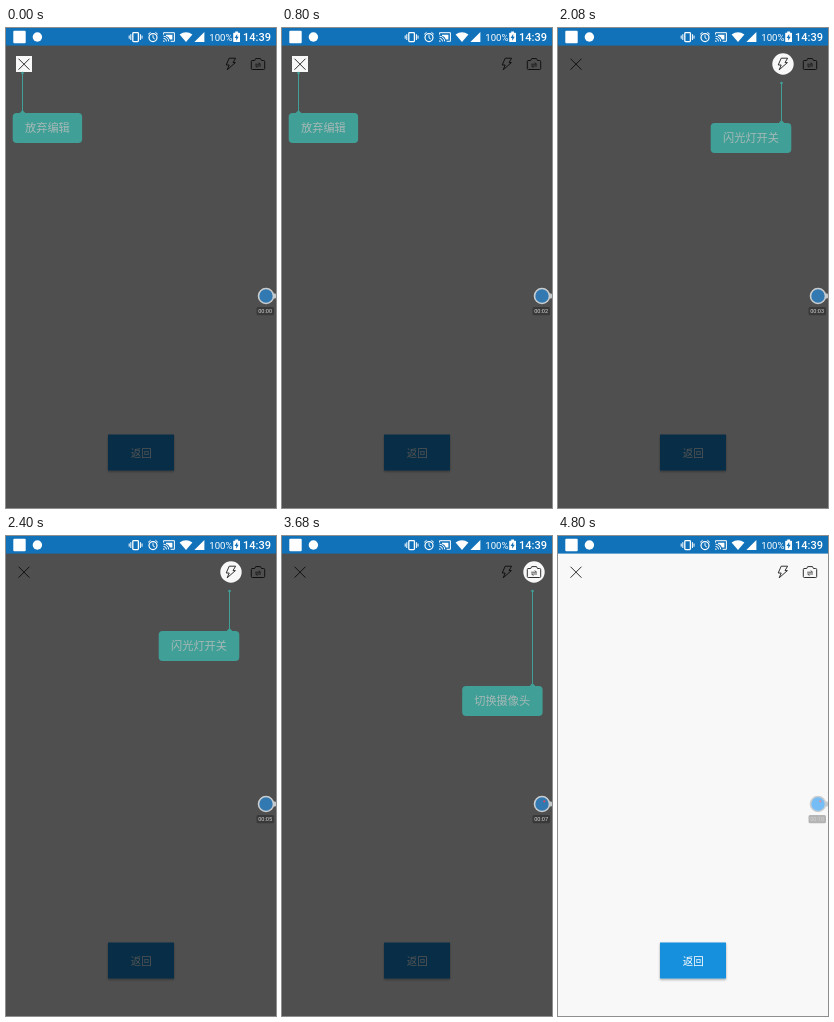
These frames come from a looping animation (270x480 px, 5600 ms). An HTML page:

```html
<!DOCTYPE html>
<html lang="zh-CN">
<head>
<meta charset="utf-8">
<title>Camera guide</title>
<style>
  html, body { margin: 0; width: 100%; height: 100%; overflow: hidden; background: #f8f8f8; }
  svg { display: block; width: 100%; height: 100%; }
  text { font-family: "Noto Sans CJK SC", "Noto Sans CJK", "Noto Sans", sans-serif; }
  .latin { font-family: Roboto, sans-serif; fill: #fff; }
  .line { fill: none; stroke: #303030; stroke-linecap: round; stroke-linejoin: round; }
  .status { fill: #fff; }
  .status .stroke { fill: none; stroke: #fff; }
  .dim { fill: #000; fill-opacity: .677; fill-rule: evenodd; }
  .tip { fill: #40a097; }
  .tip text { font-size: 11.2px; fill: #a6b8b6; }
  .tip path { fill: none; stroke: #40a097; }
  .timer { font-size: 5.6px; fill: #d4d4d4; text-anchor: middle; }

  /* --at: start step, each step lasts 800 ms */
  .one, .two {
    visibility: hidden;
    animation: one 5600ms step-end infinite;
    animation-delay: calc((var(--at) - 7) * 800ms);
  }
  .two { animation-name: two; }
  @keyframes one { 0% { visibility: visible } 14.2857%, 100% { visibility: hidden } }
  @keyframes two { 0% { visibility: visible } 28.5714%, 100% { visibility: hidden } }
</style>
</head>
<body>
<svg viewBox="0 0 270 480" preserveAspectRatio="none">
  <defs>
    <filter id="shadow" x="-10%" y="-10%" width="120%" height="130%">
      <feDropShadow dx="0" dy="1.2" stdDeviation="1" flood-opacity=".35"/>
    </filter>
  </defs>

  <rect width="270" height="480" fill="#f8f8f8"/>

  <!-- toolbar -->
  <path class="line" d="M12.8 31L23.2 41.4M23.2 31L12.8 41.4"/>
  <path class="line" d="M223.6 30.2H229.6L227 34.6H229.4L221.2 41.8L223.2 37H220.6Z"/>
  <g class="line">
    <path d="M246.3 32.5H248.7L249.7 30.6H254.5L255.5 32.5H257.7Q258.7 32.5 258.7 33.5V40.5Q258.7 41.5 257.7 41.5H246.3Q245.3 41.5 245.3 40.5V33.5Q245.3 32.5 246.3 32.5Z"/>
    <path stroke-width=".8" d="M249.6 36.2H254.6L253 34.9M254.6 38H249.6L251.2 39.3"/>
  </g>

  <!-- button -->
  <rect x="102" y="406.5" width="66" height="36" fill="#1390dc" filter="url(#shadow)"/>
  <text x="124.7" y="428.6" font-size="10.5" fill="#fff">返回</text>

  <!-- guide steps -->
  <g class="two" style="--at:0">
    <path class="dim" d="M0 17H270V480H0ZM10 28V44H26V28Z"/>
    <g class="tip">
      <path d="M16.5 45V84"/>
      <circle cx="16.5" cy="45" r="1.3"/>
      <polygon points="13.2,85.5 16.5,82 19.8,85.5"/>
      <rect x="6.7" y="85" width="69.4" height="30" rx="4"/>
      <text x="19" y="104.2">放弃编辑</text>
    </g>
  </g>
  <g class="two" style="--at:2">
    <path class="dim" d="M0 17H270V480H0ZM214.3 36a10.7 10.7 0 1 0 21.4 0a10.7 10.7 0 1 0 -21.4 0Z"/>
    <g class="tip">
      <path d="M223.5 55V94"/>
      <circle cx="223.5" cy="55" r="1.3"/>
      <polygon points="220.2,95.5 223.5,92 226.8,95.5"/>
      <rect x="152.7" y="95" width="80.6" height="30" rx="4"/>
      <text x="165" y="114.2">闪光灯开关</text>
    </g>
  </g>
  <g class="one" style="--at:4">
    <path class="dim" d="M0 17H270V480H0ZM241.3 36a10.7 10.7 0 1 0 21.4 0a10.7 10.7 0 1 0 -21.4 0Z"/>
    <g class="tip">
      <path d="M250.5 55V149"/>
      <circle cx="250.5" cy="55" r="1.3"/>
      <polygon points="247.2,150.5 250.5,147 253.8,150.5"/>
      <rect x="180.2" y="150" width="80.4" height="30" rx="4"/>
      <text x="192.2" y="169.2">切换摄像头</text>
    </g>
  </g>
  <g class="one" style="--at:5">
    <path class="dim" d="M0 17H270V480H0ZM88.3 424.5a46.7 25.2 0 1 0 93.4 0a46.7 25.2 0 1 0 -93.4 0Z"/>
    <g class="tip">
      <path d="M134.5 358V398"/>
      <circle cx="134.5" cy="398" r="1.3"/>
      <polygon points="131.2,357.5 134.5,361 137.8,357.5"/>
      <rect x="7" y="328" width="136.8" height="30" rx="4"/>
      <text x="19.2" y="347.2">单击两次删除上段拍摄</text>
    </g>
  </g>

  <!-- recorder -->
  <g>
    <rect x="267" y="265.5" width="3" height="5" rx="1" fill="#c4c9cc"/>
    <circle cx="260" cy="268" r="7.5" fill="#2196f3" fill-opacity=".6" stroke="#c9cdd0" stroke-width="1.6"/>
    <circle class="one" style="--at:4" cx="262.3" cy="265.3" r="1.1" fill="#d8485a"/>
    <circle class="one" style="--at:6" cx="262.3" cy="265.3" r="1.1" fill="#e08a9c"/>
    <rect x="250.5" y="279" width="17.5" height="8.3" rx="1.5" fill="#000" fill-opacity=".27"/>
    <g class="latin timer">
      <text class="latin timer one" style="--at:0" x="259.2" y="285.2">00:00</text>
      <text class="latin timer one" style="--at:1" x="259.2" y="285.2">00:02</text>
      <text class="latin timer one" style="--at:2" x="259.2" y="285.2">00:03</text>
      <text class="latin timer one" style="--at:3" x="259.2" y="285.2">00:05</text>
      <text class="latin timer one" style="--at:4" x="259.2" y="285.2">00:07</text>
      <text class="latin timer one" style="--at:5" x="259.2" y="285.2">00:09</text>
      <text class="latin timer one" style="--at:6" x="259.2" y="285.2">00:10</text>
    </g>
  </g>

  <!-- status bar -->
  <g class="status">
    <rect width="270" height="17.6" fill="#1272b9"/>
    <rect x="7.3" y="2.8" width="12.4" height="12.4" rx="1"/>
    <circle cx="31.4" cy="9" r="4.7"/>
    <g class="stroke">
      <rect x="126.8" y="4.6" width="5.6" height="9" rx=".8" stroke-width="1.3"/>
      <path d="M124.8 6.2V12M123.2 7.5V10.7M134.4 6.2V12M136 7.5V10.7"/>
      <circle cx="147" cy="9.6" r="4" stroke-width="1.2"/>
      <path d="M147 7.2V9.8L148.8 11M142.2 6.3L144.6 4.3M151.8 6.3L149.4 4.3"/>
      <path d="M157.6 6.6V4.7H168.4V13.3H164.6M157.5 8.2A5.2 5.2 0 0 1 162.7 13.4M157.5 10.4A3 3 0 0 1 160.5 13.4"/>
    </g>
    <path d="M157.2 12.2A1.6 1.6 0 0 1 158.8 13.8H157.2ZM160 6.7H166.4V11.4H164Q163 8.6 160 7.7Z"/>
    <path d="M173.6 6.6Q180 1.8 186.4 6.6L180 14Z"/>
    <path d="M188.4 14L198.4 4V14Z"/>
    <path d="M227.2 5.3Q227.2 4.7 227.8 4.7H229.2V3.5H232V4.7H233.4Q234 4.7 234 5.3V13.4Q234 14 233.4 14H227.8Q227.2 14 227.2 13.4Z"/>
    <path fill="#1272b9" d="M231.2 6L228.6 10H230.2V12.8L232.7 8.8H231.2Z"/>
    <text class="latin" x="203.3" y="12.8" font-size="9.6">100%</text>
    <text class="latin" x="237" y="13.2" font-size="11" font-weight="500">14:39</text>
  </g>
</svg>
</body>
</html>
```
